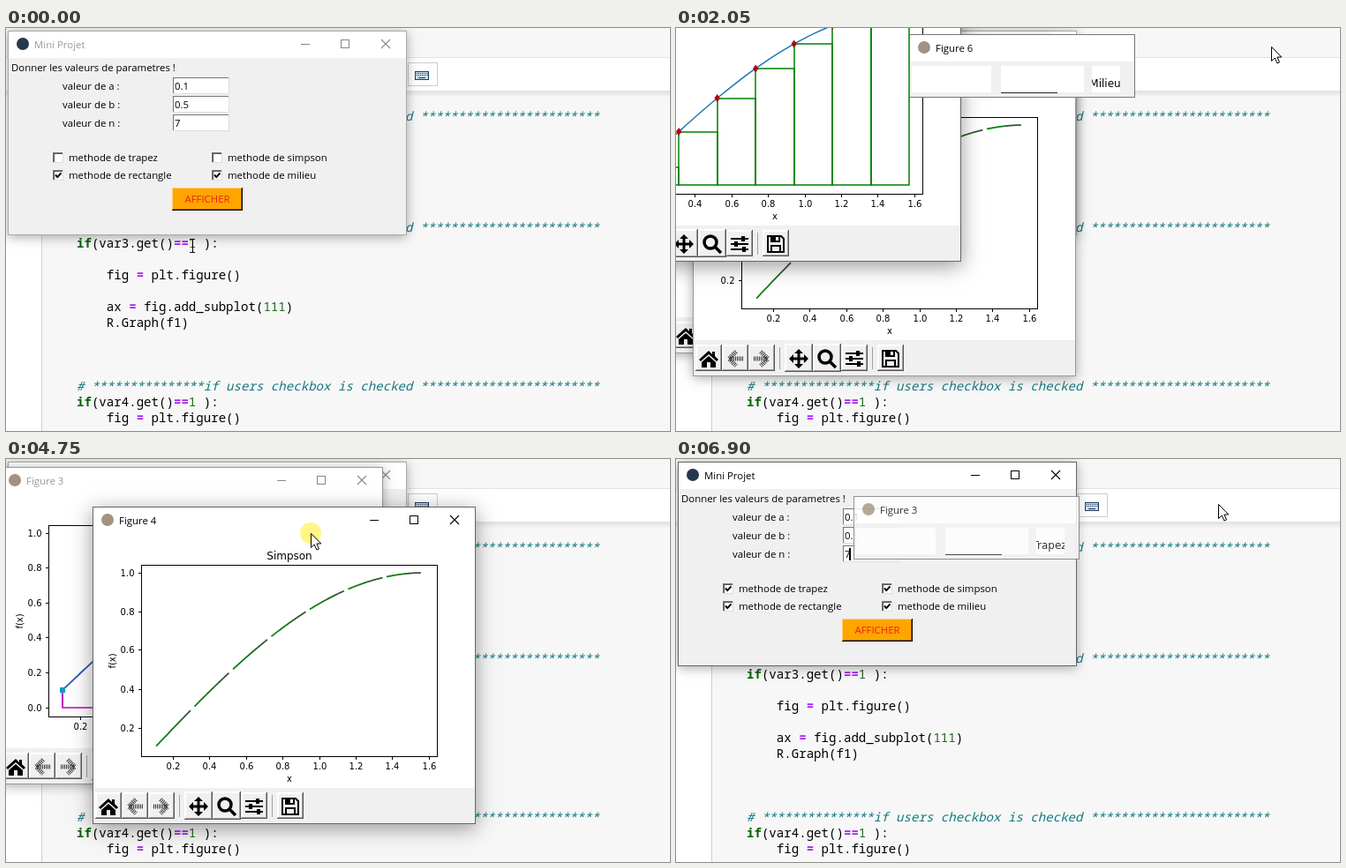
Write an HTML page with a canvas that moves like this. It is 752 px wide and 457 px high and loops after 6980 ms.

```html
<!DOCTYPE html>
<html lang="fr">
<head>
<meta charset="utf-8">
<title>Mini Projet</title>
<style>
html, body { margin: 0; width: 100%; height: 100%; overflow: hidden; }
canvas { display: block; }
</style>
</head>
<body>
<canvas id="stage" width="752" height="457"></canvas>
<script>
const ctx = document.getElementById('stage').getContext('2d');
const LOOP = 6980;
const UI = '11.4px "Open Sans", sans-serif';
const PLOT = '10px "DejaVu Sans", sans-serif';
const PLOT_TITLE = '12px "DejaVu Sans", sans-serif';
const MONO = '14.1px "Noto Sans Mono", monospace';

// ---------- timing ----------
// [first change, last change, number of changes]
const BURSTS = [[70, 700, 10], [780, 1100, 5], [1330, 1820, 7], [2050, 2140, 2], [2430, 2980, 8],
  [3130, 3820, 10], [3900, 4530, 9], [4600, 5200, 9], [5300, 5430, 2], [5590, 6210, 9], [6300, 6900, 9]];

function screenTime(t) {
  let shown = 0;
  for (const [from, to, count] of BURSTS) {
    if (t < from) break;
    const step = (to - from) / (count - 1);
    shown = from + Math.min(count - 1, Math.floor((t - from + 8) / step)) * step;
  }
  return shown;
}

// Pointer path: [ms, x, y]
const POINTER = [[0, 211, 247], [70, 150, 205], [210, 59, 147], [280, 59, 147], [420, 239, 147], [490, 239, 147],
  [630, 228, 195], [860, 228, 195], [1100, 142, -45], [1330, 142, -45], [1493, 503, 81], [1657, 525, 60],
  [1738, 492, 31], [1820, 674, 21], [2140, 674, 21], [2430, 702, 12], [2587, 107, -81], [2666, 300, 5],
  [2823, 482, 78], [2980, 424, 83], [3130, 424, 80], [3360, 431, 59], [3437, 431, 59], [3590, 623, 59],
  [3820, 623, 59], [3900, 640, 65], [4530, 266, 65], [4600, 266, 65], [4750, 345, 84], [4900, 428, 76],
  [4975, 428, 76], [5200, 600, 58], [5590, 591, 57], [5667, 531, 55], [6210, 205, 20], [6300, 205, 20],
  [6450, 330, 84], [6600, 413, 53], [6750, 612, 57], [6900, 614, 51]];

function pointerAt(t) {
  const i = POINTER.findIndex(key => key[0] > t);
  if (i < 0) return POINTER.at(-1).slice(1);
  const [t0, x0, y0] = POINTER[i - 1], [t1, x1, y1] = POINTER[i];
  const k = (t - t0) / (t1 - t0);
  return [Math.round(x0 + (x1 - x0) * k), Math.round(y0 + (y1 - y0) * k)];
}

const PRESSES = [[200, 290], [410, 500], [620, 705]];

// ---------- drawing helpers ----------
function rect(x, y, w, h, color) {
  ctx.fillStyle = color;
  ctx.fillRect(x, y, w, h);
}

function frame(x, y, w, h, color) {
  ctx.strokeStyle = color;
  ctx.lineWidth = 1;
  ctx.strokeRect(x + .5, y + .5, w - 1, h - 1);
}

function text(str, x, y, font = UI, color = '#000', align = 'left') {
  ctx.font = font;
  ctx.fillStyle = color;
  ctx.textAlign = align;
  ctx.fillText(str, x, y);
}

function stroke(d, color, width = 1) {
  ctx.strokeStyle = color;
  ctx.lineWidth = width;
  ctx.stroke(new Path2D(d));
}

function fill(d, color) {
  ctx.fillStyle = color;
  ctx.fill(new Path2D(d));
}

function disc(x, y, r, color) {
  ctx.fillStyle = color;
  ctx.beginPath();
  ctx.arc(x, y, r, 0, 7);
  ctx.fill();
}

function at(x, y, draw) {
  ctx.save();
  ctx.translate(x, y);
  draw();
  ctx.restore();
}

function bevel(x, y, w, h, light, dark) {
  rect(x, y, w, 1, light);
  rect(x, y, 1, h, light);
  rect(x, y + h - 1, w, 1, dark);
  rect(x + w - 1, y, 1, h, dark);
}

// ---------- notebook page ----------
const COMMENT = '# ' + '*'.repeat(15) + 'if users checkbox is checked ' + '*'.repeat(24);
const CODE = { 0: COMMENT, 7: COMMENT, 8: 'if(var3.get()==1 ):', 10: '    fig = plt.figure()',
  12: '    ax = fig.add_subplot(111)', 13: '    R.Graph(f1)', 17: COMMENT,
  18: 'if(var4.get()==1 ):', 19: '    fig = plt.figure()' };

function tokenStyle(token) {
  if (token[0] === '#') return ['italic ', '#147880'];
  if (token === 'if') return ['bold ', '#006400'];
  if (token[0] === '=') return ['bold ', '#a020f0'];
  return ['', /^\d/.test(token) ? '#206a20' : '#000'];
}

function drawPage() {
  rect(0, 0, 752, 457, '#f7f7f7');
  rect(0, 33, 752, 1, '#e4e4e4');
  rect(0, 34, 752, 37, '#fff');
  rect(0, 71, 40, 386, '#fff');
  rect(40, 76, 1, 381, '#cfcfcf');
  const fade = ctx.createLinearGradient(0, 71, 0, 79);
  fade.addColorStop(0, '#00000018');
  fade.addColorStop(1, '#0000');
  rect(0, 71, 752, 8, fade);
  rect(455, 39, 34, 27, '#fff');
  frame(455, 39, 34, 27, '#ccc');
  rect(463, 49, 16, 10, '#c9dff2');
  frame(463, 49, 16, 10, '#223a55');
  for (const y of [51, 53]) for (let x = 465; x < 478; x += 2) rect(x, y, 1, 1, '#223a55');
  rect(467, 56, 8, 1, '#223a55');
  for (const [row, line] of Object.entries(CODE)) {
    let x = 80;
    for (const [token] of line.matchAll(/#.*|\bif\b|=+|\b\d+\b|[a-z]\w*|./gi)) {
      const [style, color] = tokenStyle(token);
      text(token, x, 105 + row * 18, style + MONO, color);
      x += ctx.measureText(token).width;
    }
  }
}

// ---------- windows ----------
const SHADOWS = {
  none: ['#0000', 0, 0],
  soft: ['#0005', 12, 2],
  deep: ['#0006', 22, 5],
};

function windowFrame(w, h, title, { active, icon, shadow, hover = false, controls = true }) {
  ctx.save();
  [ctx.shadowColor, ctx.shadowBlur, ctx.shadowOffsetY] = SHADOWS[shadow];
  rect(0, 0, w, h, '#fff');
  ctx.restore();
  disc(17, 15, 7, icon);
  text(title, 30, 20, UI, active ? '#000' : '#999');
  if (!controls) return;
  if (hover) rect(w - 47, 1, 46, 30, '#e81123');
  const ink = active ? '#000' : '#888';
  stroke(`M${w - 120} 15.5h10`, ink);
  frame(w - 75, 10, 10, 10, ink);
  stroke(`M${w - 29} 10l10 10m0 -10l-10 10`, hover ? '#fff' : ink, 1.1);
}

function checkbox(x, y, label, checked) {
  rect(x, y, 12, 12, '#fff');
  bevel(x, y, 12, 12, '#777', '#ddd');
  rect(x + 1, y + 1, 10, 1, '#555');
  rect(x + 1, y + 1, 1, 10, '#555');
  if (checked) stroke(`M${x + 3} ${y + 5.5}l2.3 2.6l4.2 -4.8`, '#000', 2);
  text(label, x + 18, y + 10);
}

function drawForm(t, active, shadow) {
  at(2, 3, () => windowFrame(452, 232, 'Mini Projet', { active, shadow, icon: '#26384f' }));
  rect(2, 34, 452, 201, '#f0f0f0');
  text('Donner les valeurs de parametres !', 6, 49);
  [['a', '0.1'], ['b', '0.5'], ['n', '7']].forEach(([name, value], i) => {
    const y = 56 + 21 * i;
    text(`valeur de ${name} :`, 64, y + 14);
    rect(189, y, 64, 19, '#fff');
    bevel(189, y, 64, 19, '#777', '#ddd');
    text(value, 191, y + 14);
  });
  if (active) rect(196, 101, 2, 14, '#000');
  checkbox(53, 141, 'methode de trapez', t >= 280);
  checkbox(233, 141, 'methode de simpson', t >= 490);
  checkbox(53, 161, 'methode de rectangle', true);
  checkbox(233, 161, 'methode de milieu', true);
  rect(188, 181, 80, 26, '#ffa500');
  bevel(188, 181, 80, 26, '#ffd27f', '#000');
  bevel(189, 182, 78, 24, '#ffa500', '#8a5a00');
  text('AFFICHER', 228, 198, UI, '#f01e10', 'center');
  frame(2, 3, 452, 232, active ? '#666' : '#aaa');
}

// ---------- plots ----------
const A = .1, B = Math.PI / 2, N = 7, STEP = (B - A) / N;
const px = x => 70.7 + (x - A) * 207;
const py = y => 273 - 198 * y;
const snapX = x => Math.round(px(x));
const snapY = y => Math.round(py(y));
const knots = Array.from({ length: N + 1 }, (_, i) => A + i * STEP);

function curve(from, to, mapY = py) {
  let d = '';
  for (let i = 0; i <= 40; i++) {
    const x = from + (to - from) * i / 40;
    d += `${i ? 'L' : 'M'}${px(x)} ${mapY(Math.sin(x))}`;
  }
  return d;
}

function bars(sampleOffset, color) {
  for (const x of knots.slice(0, N)) {
    stroke(`M${snapX(x)} 273V${snapY(Math.sin(x + sampleOffset))}H${snapX(x + STEP)}V273Z`, color, 1.5);
  }
}

function trapez() {
  stroke(curve(A, B), '#1f77b4', 1.5);
  let chords = `M${snapX(A)} 273`;
  for (const x of knots) {
    stroke(`M${snapX(x)} 273V${py(Math.sin(x))}`, '#bf00bf', 1.7);
    chords += `L${snapX(x)} ${py(Math.sin(x))}`;
  }
  stroke(chords + 'V273Z', '#bf00bf', 1.5);
  stroke(curve(A, B), '#1f77b4', 1.5);
  for (const x of knots) rect(snapX(x) - 3, snapY(Math.sin(x)) - 3, 6, 6, '#0a9cbc');
}

const simpsonY = y => 295 - 220 * y;

function simpson() {
  for (const x of knots.slice(0, N)) {
    const from = x + .0065, to = from + .188;
    const ink = ctx.createLinearGradient(px(from), 0, px(to), 0);
    ink.addColorStop(.3, '#108010');
    ink.addColorStop(1, '#404c44');
    stroke(curve(from, to, simpsonY), ink, 1.8);
  }
}

function rectangle(t) {
  stroke(curve(A, B), '#1f77b4', 1.5);
  bars(0, '#008000');
  for (const x of knots) {
    fill(`M${px(x)} ${py(Math.sin(x)) - 4.5}l3.2 4.5l-3.2 4.5l-3.2 -4.5Z`, t < 2640 ? '#b4000c' : '#f00');
  }
}

function milieu() {
  bars(STEP / 2, '#0000f0');
  stroke(curve(A, B), '#cc6aae', 2.2);
  for (const x of knots.slice(0, N)) {
    const mid = x + STEP / 2;
    at(px(mid), py(Math.sin(mid)), () => fill('M0-3.5L1-1H3.5L1.5 1L2 3.5L0 2L-2 3.5L-1.5 1L-3.5-1H-1Z', '#c9a45c'));
  }
}

function drawAxes(title, mapY, firstTick) {
  for (let i = 1; i <= 8; i++) {
    const v = i * .2, x = Math.floor(px(v)) + .5;
    stroke(`M${x} 283v4`, '#000');
    text(v.toFixed(1), x, 298, PLOT, '#000', 'center');
  }
  for (let i = firstTick; i <= 5; i++) {
    const v = i * .2, y = Math.floor(mapY(v)) + .5;
    stroke(`M52 ${y}h4`, '#000');
    text(v.toFixed(1), 47.5, y + 3.5, PLOT, '#000', 'right');
  }
  frame(55, 66, 336, 218, '#000');
  text(title, 223, 60, PLOT_TITLE, '#000', 'center');
  text('x', 223, 312, PLOT, '#000', 'center');
  at(26, 175, () => {
    ctx.rotate(-Math.PI / 2);
    text('f(x)', 0, 0, PLOT, '#000', 'center');
  });
}

// ---------- toolbar ----------
function arrow(side) {
  ctx.scale(side, 1);
  ctx.setLineDash([1, 1]);
  stroke('M1-8L-7 0L1 8M-6 0H9', '#333', 5);
  ctx.setLineDash([]);
}

// [left, button size, icon]
const TOOLS = [
  [3, 30, () => fill('M-11 1L0-9L4-5V-8H7V-3L11 1L9 3L0-5L-9 3ZM-8 4L0-3L8 4V10H2V4H-2V10H-8Z', '#000')],
  [33, 30, () => arrow(1)],
  [63, 30, () => arrow(-1)],
  [104, 32, () => {
    stroke('M-8 0H8M0-8V8', '#000', 3);
    fill('M-11 0l5-5v10zM11 0l-5-5v10zM0-11l-5 5h10zM0 11l-5-5h10z', '#000');
  }],
  [136, 32, () => stroke('M5 -2A7 7 0 1 1 -9 -2A7 7 0 1 1 5 -2M3 3L10 10', '#000', 3.5)],
  [168, 30, () => {
    stroke('M-10-6H10M-10 0H10M-10 6H10', '#000', 2);
    fill('M2-9h4v6h-4zM-6-3h4v6h-4zM3 3h4v6h-4z', '#000');
  }],
  [209, 30, () => {
    stroke('M-9-9H6L9-6V9H-9ZM-5 9V2H5V9', '#000', 2);
    fill('M-6-9H5V-2H-6Z', '#000');
    rect(0, -8, 3, 4, '#fff');
  }],
];

function drawToolbar() {
  rect(0, 319, 434, 41, '#f0f0f0');
  for (const [x, size, icon] of TOOLS) {
    const y = 339 - size / 2;
    bevel(x, y, size, size, '#fff', '#555');
    bevel(x + 1, y + 1, size - 2, size - 2, '#fff', '#a0a0a0');
    at(x + size / 2, 340, icon);
  }
  for (const x of [98, 203]) rect(x, 327, 1, 25, '#a0a0a0');
}

// ---------- figures ----------
// drag: [start, end]; grip: pointer offset inside the window
const FIGURES = [
  { no: 3, title: 'Trapez', plot: trapez, open: 780, drag: [6300, 6600], grip: [212, 11], close: 6825, gone: LOOP },
  { no: 4, title: 'Simpson', plot: simpson, mapY: simpsonY, firstTick: 1, open: 860,
    drag: [4600, 4900], grip: [247, 30], close: 5590, gone: 5740 },
  { no: 5, title: 'Rectangle', plot: rectangle, open: 940, drag: [2587, 3437], grip: [218, 14], close: 3740, gone: 3820 },
  { no: 6, title: 'Milieu', plot: milieu, open: 1020, drag: [1330, 1738], grip: [228, 24], close: 2050, gone: 2140 },
];
const ICON = '#a3927f';

function drawFigure(fig, t, active, hover) {
  windowFrame(434, 360, `Figure ${fig.no}`, { active, hover, icon: ICON, shadow: active ? 'deep' : 'soft' });
  drawAxes(fig.title, fig.mapY || py, fig.firstTick || 0);
  fig.plot(t);
  drawToolbar();
  frame(0, 0, 434, 360, active ? '#666' : '#999');
}

function drawClosing(fig, t) {
  ctx.globalAlpha = t > 6890 ? .8 : 1;
  windowFrame(256, 72, `Figure ${fig.no}`, { active: true, icon: ICON, shadow: 'none', controls: false });
  rect(0, 31, 256, 41, '#f0f0f0');
  for (const [x, w] of [[3, 90], [104, 94], [207, 32]]) rect(x, 36, w, 30, '#fff');
  rect(104, 66, 64, 1, '#222');
  frame(0, 0, 256, 72, '#777');
  ctx.beginPath();
  ctx.rect(207, 40, 32, 26);
  ctx.clip();
  text(fig.title, 222, 60, PLOT_TITLE, '#000', 'center');
}

// ---------- pointer ----------
function drawPointer(t, x, y, pressed) {
  if (t < 70) {
    at(x, y, () => stroke('M-3-7.5h2.5h3.5M-3 7.5h6M.5-7V7', '#000'));
    return;
  }
  if (pressed) disc(x, y, 12, 'rgba(255,240,50,.6)');
  at(x + .5, y + .5, () => {
    const shape = 'M0 0V16L3.7 12.5L6.4 18.5L9 17.4L6.4 11.5H11.3Z';
    fill(shape, '#fff');
    stroke(shape, '#000');
  });
}

function draw(t) {
  const [mx, my] = pointerAt(t);
  const open = FIGURES.filter(fig => t >= fig.open && t < fig.gone);
  const front = open.filter(fig => t < fig.close).at(-1);
  const pressed = PRESSES.concat(FIGURES.map(fig => fig.drag)).some(([from, to]) => t >= from && t < to);
  const formActive = !front && t >= 200;

  drawPage();
  drawForm(t, formActive, formActive && !open.length ? 'deep' : 'soft');
  for (const fig of open) {
    const [from, to] = fig.drag;
    const grab = pointerAt(Math.min(to, Math.max(from, t)));
    const x = grab[0] - fig.grip[0], y = grab[1] - fig.grip[1];
    const hover = fig === front && mx >= x + 387 && mx < x + 434 && my >= y && my < y + 31;
    at(x, y, () => t < fig.close ? drawFigure(fig, t, fig === front, hover) : drawClosing(fig, t));
  }
  drawPointer(t, mx, my, pressed);
}

const start = performance.now();
function tick() {
  draw(screenTime((performance.now() - start) % LOOP));
  requestAnimationFrame(tick);
}
tick();
</script>
</body>
</html>
```
